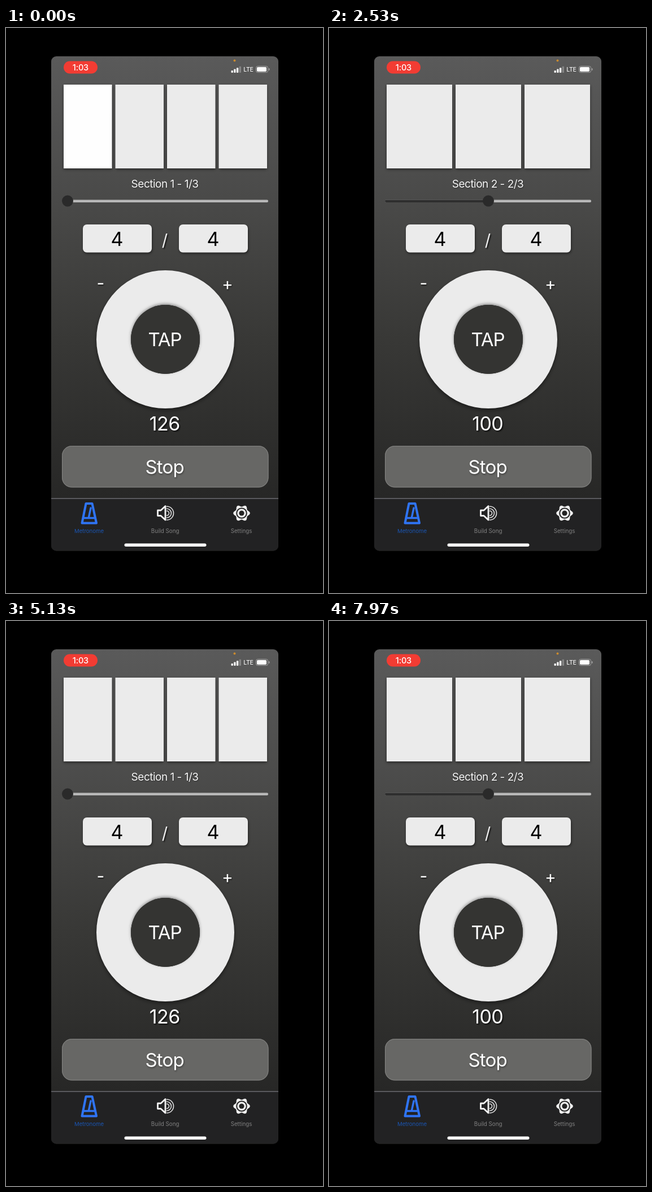
Write an HTML page with a canvas that moves like this. It is 561 px wide and 998 px high and loops after 8 s.

```html
<!DOCTYPE html>
<html lang="en">
<head>
<meta charset="utf-8">
<title>Metronome</title>
<style>
  html, body { margin: 0; width: 100%; height: 100%; overflow: hidden; background: #000; }
  canvas { display: block; }
</style>
</head>
<body>
<canvas id="stage" width="561" height="998"></canvas>
<script>
const ctx = document.getElementById('stage').getContext('2d');
const LOOP = 8000, LAG = 30, HOLD = 60, FADE = 90;
const PALE = '#ebebeb', WHITE = '#fdfdfd', DARK = '#2a2a2a', BLUE = '#2f74f5';
const SECTIONS = [
  { beats: 4, bpm: 126, knob: 109 },
  { beats: 3, bpm: 100, knob: 282 },
  { beats: 2, bpm: 100, knob: 454.5 }
];

const skin = ctx.createLinearGradient(0, 50, 0, 831);
skin.addColorStop(0, '#5a5a5a');
skin.addColorStop(0.32, '#4a4a49');
skin.addColorStop(0.64, '#383836');
skin.addColorStop(1, '#272726');

// Which section and beat sounds at time t, and how long ago it began
function poseAt(t) {
  for (let i = 0; ; i = (i + 1) % SECTIONS.length) {
    const beatMs = 60000 / SECTIONS[i].bpm;
    const length = SECTIONS[i].beats * beatMs + (i === 0 ? LAG : 0);
    if (t < length) {
      const beat = Math.min(Math.floor(t / beatMs), SECTIONS[i].beats - 1);
      return { index: i, beat, age: t - beat * beatMs };
    }
    t -= length;
  }
}

function shadow(x, y, blur, alpha, draw) {
  ctx.save();
  ctx.shadowColor = `rgba(0,0,0,${alpha})`;
  ctx.shadowOffsetX = x;
  ctx.shadowOffsetY = y;
  ctx.shadowBlur = blur;
  draw();
  ctx.restore();
}

function box(x, y, w, h, r, fill) {
  ctx.beginPath();
  ctx.roundRect(x, y, w, h, r);
  ctx.fillStyle = fill;
  ctx.fill();
}

function disc(x, y, r, fill) {
  ctx.beginPath();
  ctx.arc(x, y, r, 0, Math.PI * 2);
  ctx.fillStyle = fill;
  ctx.fill();
}

function path(points, color, width, closed) {
  ctx.beginPath();
  points.forEach(([x, y]) => ctx.lineTo(x, y));
  if (closed) ctx.closePath();
  ctx.strokeStyle = color;
  ctx.lineWidth = width;
  ctx.lineCap = ctx.lineJoin = 'round';
  ctx.stroke();
}

function label(text, x, y, size, color = '#fff', spacing = 0, weight = 400) {
  ctx.font = `${weight} ${size}px Inter, "Liberation Sans", sans-serif`;
  ctx.letterSpacing = spacing + 'px';
  ctx.textAlign = 'center';
  ctx.fillStyle = color;
  ctx.fillText(text, x + spacing / 2, y);
}

function statusBar() {
  box(102, 58.5, 60, 22, 11, '#f23c33');
  label('1:03', 132, 75, 14.5, '#fff', -0.2, 500);
  disc(404.5, 57.5, 2, '#c98a2e');
  for (let i = 0; i < 4; i++) {
    const h = 4 + i * 2.4;
    box(398.5 + i * 4.7, 79 - h, 3.4, h, 1, i < 3 ? '#f4f4f4' : '#858585');
  }
  label('LTE', 429, 77, 10.5, '#f0f0f0', -0.3, 500);
  ctx.beginPath();
  ctx.roundRect(442.5, 67.5, 21, 11, 3);
  ctx.strokeStyle = '#a5a5a5';
  ctx.lineWidth = 1;
  ctx.stroke();
  box(444, 69, 17, 8, 1.8, '#fff');
  box(465, 71, 1.5, 4, 0.7, '#a5a5a5');
}

function beatBoxes(pose) {
  const count = SECTIONS[pose.index].beats, gap = 6;
  const w = (360 - gap * (count - 1)) / count;
  const glow = 1 - Math.min(1, Math.max(0, (pose.age - HOLD) / FADE));
  for (let i = 0; i < count; i++) {
    const v = 235 + (i === pose.beat ? Math.round(19 * glow) : 0);
    shadow(0, 2, 5, 0.5, () => box(102 + i * (w + gap), 100, w, 148, 0, `rgb(${v},${v},${v})`));
  }
}

function slider(x) {
  box(99, 303.5, 365, 4.5, 2, '#b8b8b8');
  box(99, 303.5, x - 99, 4.5, 2, '#2e2e2e');
  disc(x, 305.5, 10, DARK);
}

function signature() {
  for (const x of [136, 306]) {
    shadow(1, 2, 4, 0.5, () => box(x, 347, 122, 49.5, 7, PALE));
    label('4', x + 60.5, 385, 34, '#000');
  }
  shadow(2, 2, 2, 0.6, () => label('/', 281, 385, 29, '#f0f0f0'));
}

function dial() {
  const ring = () => {
    ctx.beginPath();
    ctx.arc(282, 550, 122, 0, Math.PI * 2);
    ctx.arc(282, 550, 61, 0, Math.PI * 2, true);
    ctx.fillStyle = PALE;
    ctx.fill();
  };
  shadow(0, 3, 6, 0.45, ring);
  shadow(0, -2, 5, 0.4, () => disc(282, 550, 61, '#343432'));
  label('TAP', 281.5, 562, 33, '#fff', -1.2);
  shadow(1, 2, 2, 0.5, () => {
    label('-', 167.5, 461, 30, '#fff');
    label('+', 392, 463, 30, '#fff');
  });
}

function stopButton() {
  box(99, 738, 365.5, 73.5, 17, '#676765');
  ctx.beginPath();
  ctx.roundRect(99.5, 738.5, 364.5, 72.5, 17);
  ctx.strokeStyle = '#858583';
  ctx.lineWidth = 1;
  ctx.stroke();
  shadow(1, 2, 3, 0.35, () => label('Stop', 281, 787, 33, '#fff', -0.8));
}

function metronomeIcon() {
  path([[141.5, 840], [152.5, 840], [160, 874.5], [134.5, 874.5]], BLUE, 4, true);
  path([[138, 865.5], [156, 865.5]], BLUE, 3.5);
  path([[146.5, 864], [150, 848]], BLUE, 3.5);
}

function speakerIcon() {
  path([[268.5, 852], [274, 852], [282, 844.5], [282, 869], [274, 861.5], [268.5, 861.5]], '#f2f2f2', 2.8, true);
  for (const r of [4, 8, 12]) {
    ctx.beginPath();
    ctx.arc(284.5, 857, r, -Math.PI / 2, Math.PI / 2);
    ctx.strokeStyle = '#d8d8d8';
    ctx.lineWidth = 1.7;
    ctx.stroke();
  }
}

function gearIcon() {
  ctx.beginPath();
  for (let a = 0; a < Math.PI * 2; a += 0.05) {
    const r = 13.1 + 1.7 * Math.cos(6 * a);
    ctx.lineTo(417 + r * Math.cos(a), 857 + r * Math.sin(a));
  }
  ctx.closePath();
  ctx.fillStyle = '#f0f0f0';
  ctx.fill();
  disc(417, 857, 9.8, '#232323');
  disc(417, 857, 7.8, '#f0f0f0');
  disc(417, 857, 4.6, '#232323');
}

function tabBar() {
  ctx.fillStyle = '#222223';
  ctx.fillRect(80, 831, 402, 93);
  ctx.fillStyle = '#7c7c83';
  ctx.fillRect(80, 830.5, 402, 1.2);
  metronomeIcon();
  speakerIcon();
  gearIcon();
  label('Metronome', 147, 892, 9.6, '#1a56b4');
  label('Build Song', 281.7, 892, 9.8, '#808080');
  label('Settings', 416.5, 892, 9.8, '#808080');
  box(209.5, 910.5, 145, 5.5, 2.75, '#fff');
}

function render(t) {
  const pose = poseAt(t);
  const section = SECTIONS[pose.index];
  const number = pose.index + 1;
  ctx.fillStyle = '#000';
  ctx.fillRect(0, 0, 561, 998);
  ctx.save();
  ctx.beginPath();
  ctx.roundRect(80, 50, 402, 873.5, 9);
  ctx.clip();
  ctx.fillStyle = skin;
  ctx.fillRect(80, 50, 402, 874);
  statusBar();
  beatBoxes(pose);
  shadow(1, 1, 2, 0.35, () =>
    label(`Section ${number} - ${number}/3`, 281.3, 282, 19, '#f6f6f6', -0.5));
  slider(section.knob);
  signature();
  dial();
  shadow(2, 2, 2, 0.65, () => label(section.bpm, 281, 711, 34, '#fff', -0.6));
  stopButton();
  tabBar();
  ctx.restore();
}

const start = performance.now();
function tick() {
  render((performance.now() - start) % LOOP);
  requestAnimationFrame(tick);
}
tick();
</script>
</body>
</html>
```
